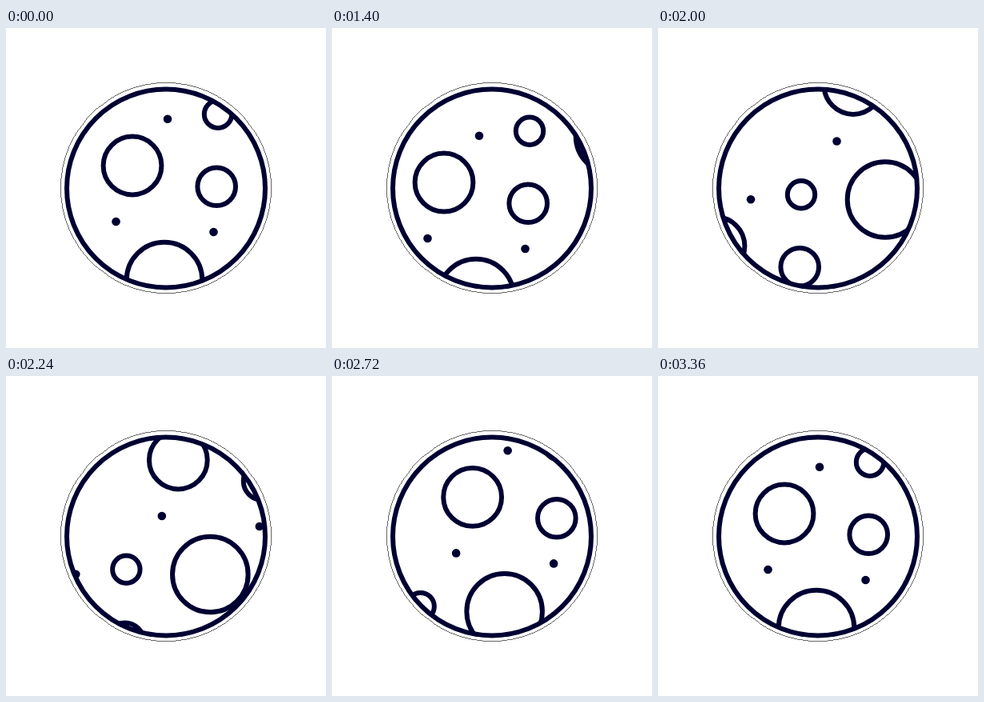
Recreate the animation shown at these times as an HTML page. Size 400 by 400 pixels, loop 3.4 s.

```html
<!DOCTYPE html>
<html lang="en">
<head>
<meta charset="utf-8">
<title>Turning moon</title>
<style>
  html, body { margin: 0; width: 100%; height: 100%; overflow: hidden; background: #fff; }
  svg { display: block; width: 100vw; height: 100vh; }
  .line { fill: none; stroke: #000032; stroke-width: 6; }
  .dot { fill: #000032; }
  .rim { fill: none; stroke: #000; stroke-width: .6; shape-rendering: crispEdges; }
</style>
</head>
<body>
<svg viewBox="0 0 400 400">
  <defs>
    <clipPath id="disc"><circle cx="200" cy="200.5" r="124.5"/></clipPath>
    <g id="craters">
      <circle class="line" cx="158" cy="172" r="36.4"/>
      <circle class="line" cx="263.2" cy="198.3" r="23.8"/>
      <circle class="line" cx="265" cy="107.7" r="17.2"/>
      <circle class="line" cx="198" cy="315" r="47.3"/>
      <circle class="dot" cx="202" cy="113.8" r="5.3"/>
      <circle class="dot" cx="137.5" cy="242" r="5.3"/>
      <circle class="dot" cx="259.5" cy="255" r="5.3"/>
    </g>
  </defs>
  <circle class="rim" cx="200" cy="200" r="131.6"/>
  <g clip-path="url(#disc)">
    <g id="surface">
      <use href="#craters"/>
      <use href="#craters" x="172" y="-201"/>
    </g>
  </g>
  <circle class="line" cx="200" cy="200.5" r="124"/>
</svg>
<script>
  const LOOP = 3400, STEP = 40;
  const SHIFT = { x: -172, y: 201 };

  // time in ms, share of the turn, speed in share per second
  const keys = [
    [960, 0, 0],
    [1400, .1046, .47],
    [2000, .5, .72],
    [2480, .8045, .48],
    [2960, .958, .21],
    [3360, 1, 0]
  ];

  const surface = document.getElementById('surface');

  // Cubic Hermite curve through the keys
  function turn(t) {
    if (t <= keys[0][0]) return 0;
    const i = keys.findIndex(k => t < k[0]);
    if (i < 0) return 1;
    const [t0, p0, v0] = keys[i - 1];
    const [t1, p1, v1] = keys[i];
    const d = (t1 - t0) / 1000;
    const u = (t - t0) / (t1 - t0);
    const w = 1 - u;
    return p0 * w * w * (1 + 2 * u) + p1 * u * u * (3 - 2 * u)
      + d * u * w * (v0 * w - v1 * u);
  }

  function draw(ms) {
    const t = Math.floor((ms % LOOP) / STEP) * STEP;
    const p = turn(t);
    surface.setAttribute('transform', `translate(${SHIFT.x * p} ${SHIFT.y * p})`);
  }

  const start = performance.now();
  function tick() {
    draw(performance.now() - start);
    requestAnimationFrame(tick);
  }
  tick();
</script>
</body>
</html>
```
